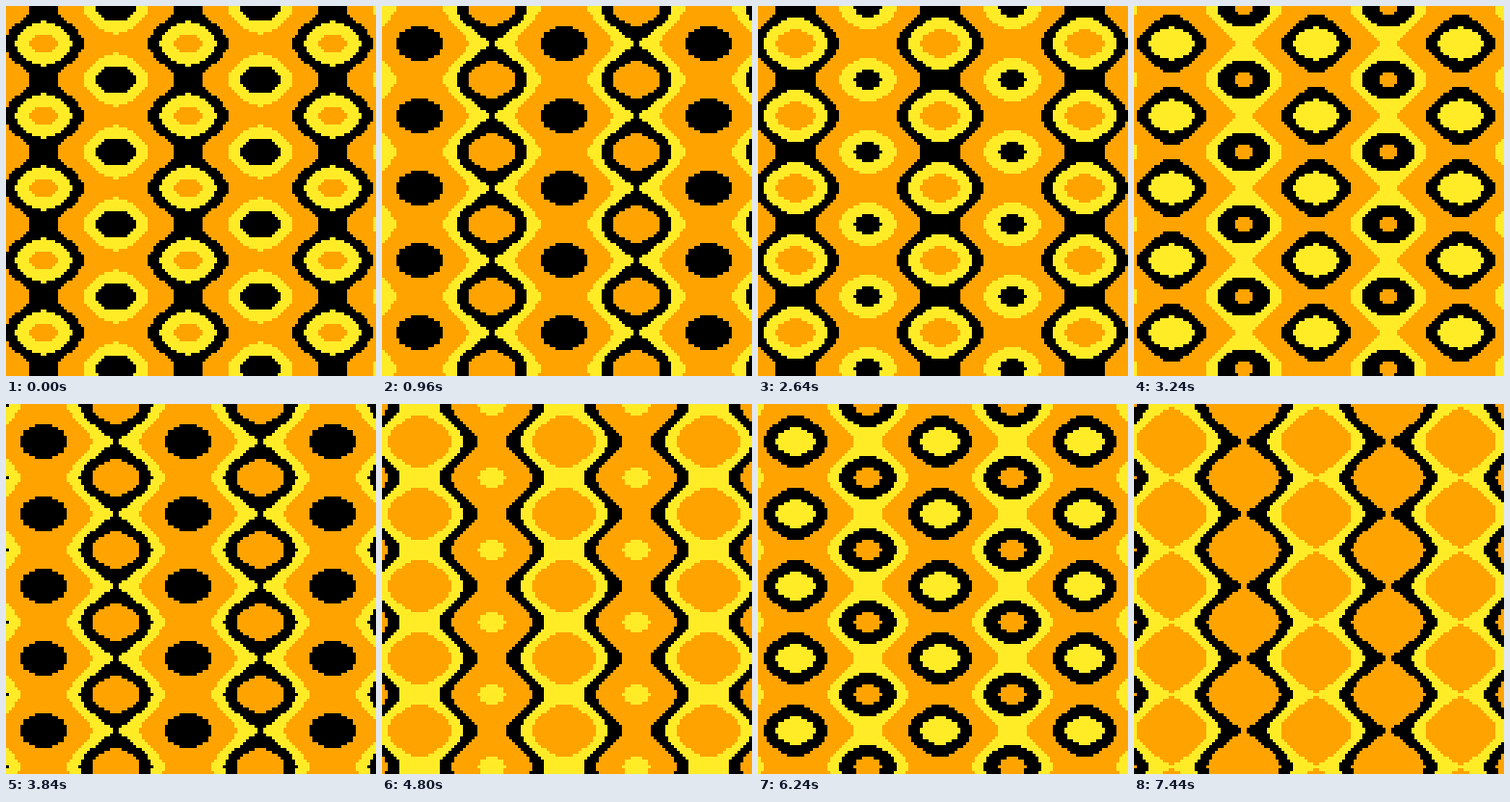
An HTML page with a canvas that plays this animation: 384 by 384 pixels, repeating every 7560 ms.

```html
<!DOCTYPE html>
<html lang="en">
<head>
<meta charset="utf-8">
<title>Wave bands</title>
<style>
  html, body { margin: 0; width: 100%; height: 100%; overflow: hidden; background: #ffa300; }
  canvas { display: block; width: 384px; height: 384px; image-rendering: pixelated; }
</style>
</head>
<body>
<canvas width="384" height="384"></canvas>
<script>
const CELLS = 128, SIZE = 3, STEP_MS = 120, STEPS = 63;
const YELLOW = '#ffec27', BLACK = '#000000', ORANGE = '#ffa300';
const BANDS = [YELLOW, BLACK, ORANGE, ORANGE];
const ctx = document.querySelector('canvas').getContext('2d');

// Depth below the crests, 0 to 6: a wide wave across plus a short wave down.
const cells = [...Array(CELLS).keys()];
const across = cells.map(x => 2 * Math.sin(2 * Math.PI * x / 50));
const down = cells.map(y => Math.cos(2 * Math.PI * y / 25));

function draw(step) {
  // The small drift settles cells that lie exactly on a band edge.
  const start = 1 / 3 - step / 6 + (19.5 - step) * 1e-6;
  ctx.fillStyle = ORANGE;
  ctx.fillRect(0, 0, CELLS * SIZE, CELLS * SIZE);
  for (let y = 0; y < CELLS; y++) {
    for (let x = 0; x < CELLS; x++) {
      const depth = 3 - across[x] + down[y];
      const color = BANDS[Math.floor(depth - start) & 3];
      if (color === ORANGE) continue;
      ctx.fillStyle = color;
      ctx.fillRect(x * SIZE, y * SIZE, SIZE, SIZE);
    }
  }
}

const begin = performance.now();
let shown = -1;

function tick() {
  const step = Math.floor((performance.now() - begin) / STEP_MS) % STEPS;
  if (step !== shown) draw(shown = step);
  requestAnimationFrame(tick);
}
tick();
</script>
</body>
</html>
```
